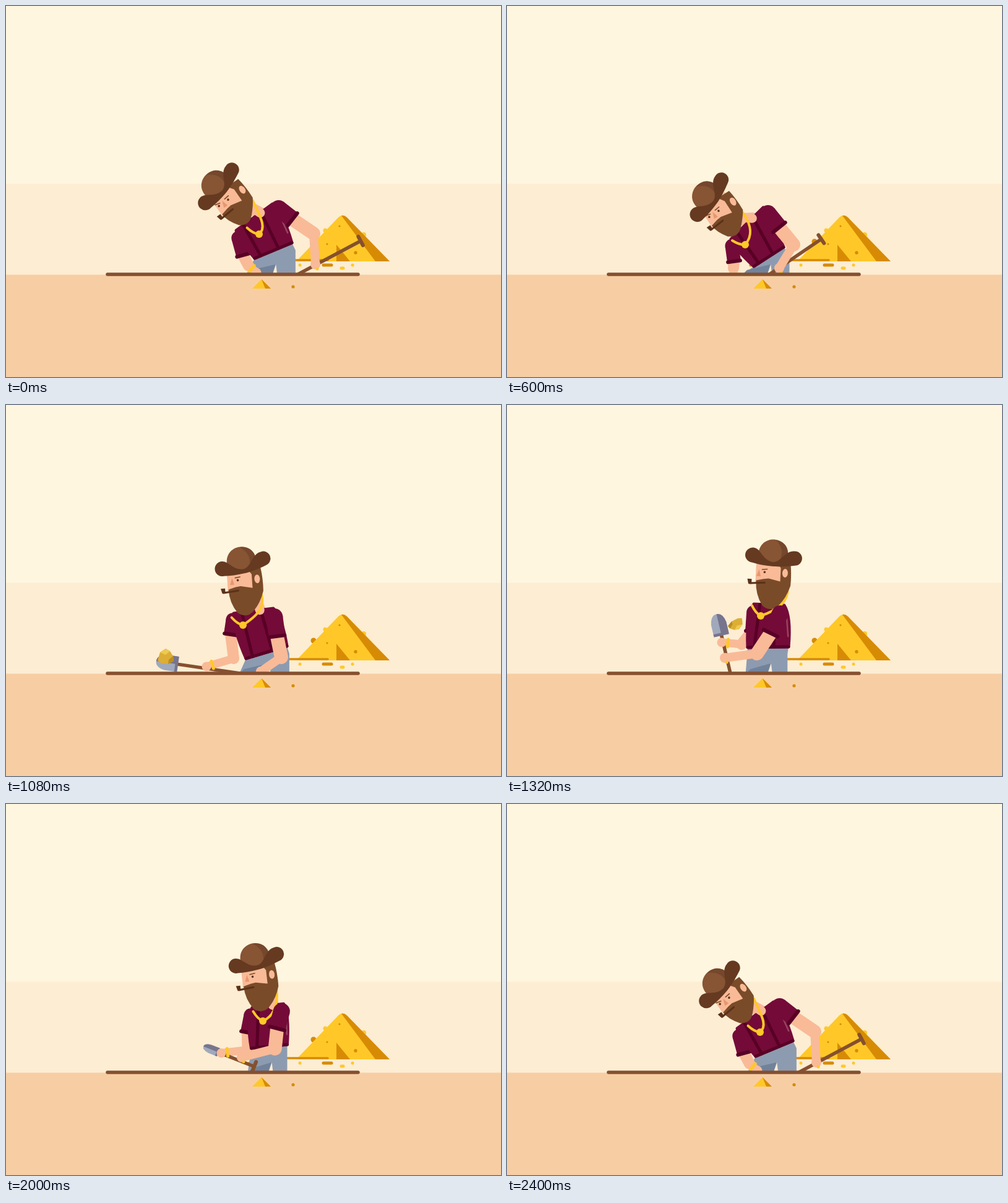
An HTML page with a canvas for the animation above (2440 ms loop, 800x600 px).

```html
<!DOCTYPE html>
<html lang="en">
<head>
<meta charset="utf-8">
<title>Gold digger</title>
<style>
html, body { margin: 0; width: 100%; height: 100%; overflow: hidden; background: #fff6e0; }
canvas { display: block; }
</style>
</head>
<body>
<canvas id="stage" width="800" height="600"></canvas>
<script>
const ctx = document.getElementById('stage').getContext('2d');
const LOOP = 2440, RAD = Math.PI / 180;
const C = {
  skin: '#f9ba97', skinDark: '#e7966d', shirt: '#740a38', trim: '#580025', sheen: '#964460',
  hair: '#7a4b29', hat: '#875434', hatShade: '#75472c', brim: '#653a20', wood: '#85502f', pipe: '#5b3119',
  jeans: '#8d9bb0', jeansDark: '#71829b', gold: '#ffc828', goldDark: '#d78b04',
  steel: '#a0a9bc', steelDark: '#77748d', ore: '#dcae35', oreLight: '#edca50', oreDark: '#b98d20'
};

// Pose times; the first pose returns at 2400 and is held across the loop.
const TIMES = [100, 600, 1080, 1320, 1800, 2200, 2400, 2540];
const BODY = {
  head: [[335, 286], [318, 304], [379, 247], [431, 235], [423, 234], [367, 260]],
  tilt: [[-35, -50], [-33, -54], [-4, -13], [3, 6], [0, -3], [-18, -32]], // head, hat
  shoulderL: [[372, 363], [362, 377], [368, 337], [399, 322], [405, 322], [385, 344]],
  hipL: [[402, 408], [399, 421], [388, 410], [389, 392], [395, 387], [398, 405]],
  hipR: [[462, 383], [447, 390], [454, 390], [455, 391], [459, 388], [450, 390]],
  shoulderR: [[431, 320], [414, 326], [432, 329], [448, 324], [451, 324], [443, 322]],
  pendant: [[409, 369], [385, 386], [383, 356], [410, 341], [418, 344], [411, 361]]
};
const LIMBS = {
  nearCuff: [[463, 345], [440, 358], [438, 374], [426, 369], [427, 365], [454, 360]],
  nearElbow: [[497, 368], [463, 386], [445, 408], [404, 402], [413, 398], [467, 392]],
  nearHand: [[500, 418], [440, 424], [412, 431], [352, 409], [357, 406], [426, 415]],
  farCuff: [[383, 403], [367, 413], [363, 371], [396, 366], [400, 364], [380, 381]],
  farElbow: [[392, 420], [366, 424], [368, 410], [379, 387], [395, 391], [386, 408]],
  farHand: [[405, 431], [366, 445], [324, 423], [347, 384], [353, 396], [343, 412]],
  base: [[449, 446], [392, 456], [275, 419], [346, 370], [351, 386], [332, 421]],
  grip: [[573, 380], [508, 377], [414, 439], [378, 506], [364, 428], [473, 421]]
};

const lerp = (a, b, k) => [a[0] + (b[0] - a[0]) * k, a[1] + (b[1] - a[1]) * k];
const add = (a, b) => [a[0] + b[0], a[1] + b[1]];
const turn = ([x, y], r) => [x * Math.cos(r) - y * Math.sin(r), x * Math.sin(r) + y * Math.cos(r)];
const angle = (a, b) => Math.atan2(b[1] - a[1], b[0] - a[0]);

// Monotone cubic interpolation between poses.
function sample(track, t) {
  if (t < TIMES[0]) t += LOOP;
  let i = 0;
  while (i < 6 && t >= TIMES[i + 1]) i++;
  const key = n => track[n % 6], span = TIMES[i + 1] - TIMES[i], k = (t - TIMES[i]) / span;
  if (i === 6) return track[0];
  return [0, 1].map(c => {
    const slope = n => (key(n + 1)[c] - key(n)[c]) / (TIMES[n + 1] - TIMES[n]);
    const tangent = n => {
      if (n === 0 || n === 6) return 0;
      const a = slope(n - 1), b = slope(n);
      return a * b <= 0 ? 0 : 2 * a * b / (a + b);
    };
    const k2 = k * k, k3 = k2 * k, s = 3 * k2 - 2 * k3;
    return key(i)[c] * (1 - s) + key(i + 1)[c] * s
      + span * ((k3 - 2 * k2 + k) * tangent(i) + (k3 - k2) * tangent(i + 1));
  });
}

function trace(points) {
  ctx.beginPath();
  points.forEach(p => ctx.lineTo(...p));
}
function line(color, width, points, cap = 'round') {
  trace(points);
  Object.assign(ctx, { strokeStyle: color, lineWidth: width, lineCap: cap, lineJoin: 'round' });
  ctx.stroke();
}
function shape(color, ...points) {
  trace(points);
  ctx.fillStyle = color;
  ctx.fill();
}
function disc(color, [x, y], rx, ry = rx) {
  ctx.beginPath();
  ctx.ellipse(x, y, rx, ry, 0, 0, 7);
  ctx.fillStyle = color;
  ctx.fill();
}
function path(color, d) {
  ctx.fillStyle = color;
  ctx.fill(new Path2D(d));
}
function at([x, y], rotation, draw) {
  ctx.save();
  ctx.translate(x, y);
  ctx.rotate(rotation);
  draw();
  ctx.restore();
}

function scenery() {
  [['#fff6e0', 0], ['#fcedd3', 287.5], ['#f7cea4', 434.5]].forEach(([color, y]) => {
    ctx.fillStyle = color;
    ctx.fillRect(0, y, 800, 600);
  });
  disc(C.goldDark, [497, 381], 4.5);
  disc(C.gold, [516, 363], 3.5);
  disc(C.gold, [578, 370], 4);
  path(C.gold, 'M469 413L537 342Q544 335 551 342L620 413Z');
  path(C.goldDark, 'M542 339Q547 338 551 342L620 413H597Z');
  shape(C.goldDark, [534, 386], [534, 413], [556, 413]);
  disc(C.goldDark, [539, 356], 1.6);
  disc(C.goldDark, [519, 385], 1.6);
  disc(C.goldDark, [565, 399], 2.7);
  line(C.goldDark, 3.5, [[446, 411], [520, 411]]);
  line(C.goldDark, 5, [[513, 419], [526, 419]]);
  line(C.gold, 5, [[542, 424], [545, 424]]);
  disc(C.gold, [475, 419], 2.5);
  disc(C.gold, [560, 419], 2.5);
  disc(C.goldDark, [394, 419], 2.6);
  shape(C.gold, [398, 457], [413, 442], [428, 457]);
  shape(C.goldDark, [413, 442], [428, 457], [419, 457]);
  disc(C.goldDark, [464, 454], 2.6);
}

function nugget(center, rotation, squash) {
  at(center, rotation, () => {
    ctx.scale(1, squash);
    shape(C.ore, [-13, 6], [-9, -7], [0, -13], [7, -9], [12, -1], [13, 7], [4, 12], [-7, 11]);
    shape(C.oreLight, [-9, -7], [0, -13], [7, -9], [0, -3]);
    shape(C.oreDark, [4, 12], [13, 7], [12, -1], [5, 5]);
  });
}

function jeans(p, lean) {
  const left = p.hipL[0] - 28 * lean - 3, right = p.hipR[0] + 20 * lean - 2;
  const gap = left + (right - left) * .58;
  shape(C.jeans, p.hipL, p.hipR, [right, p.hipR[1] + 12], [right, 435],
    [gap + 4, 435], [gap + 2, 418], [gap - 4, 435], [left, 435]);
  shape(C.jeansDark, [left, 435], [left + 8, 427], [gap + 1, 418], [gap - 4, 435]);
}

function torso(p, r) {
  const offset = (a, b, x, y) => add(lerp(a, b, .5), turn([x, y], r));
  ctx.beginPath();
  ctx.moveTo(...p.shoulderL);
  ctx.quadraticCurveTo(...offset(p.shoulderL, p.hipL, -7, -12), ...p.hipL);
  ctx.lineTo(...p.hipR);
  ctx.quadraticCurveTo(...offset(p.shoulderR, p.hipR, 8, -16), ...p.shoulderR);
  ctx.closePath();
  Object.assign(ctx, { fillStyle: C.shirt, strokeStyle: C.shirt, lineWidth: 5, lineJoin: 'round' });
  ctx.fill();
  ctx.stroke();
  [.16, .64].forEach(k => line(C.trim, 5, [
    lerp(p.shoulderL, p.shoulderR, k + .04), lerp(p.hipL, p.hipR, k)
  ]));
  line(C.trim, 5, [p.hipL, p.hipR]);
  line(C.sheen, 2.5, [add(p.shoulderR, turn([3, 9], r)), add(lerp(p.shoulderR, p.hipR, .75), turn([1, 0], r))]);
}

function arm(shoulder, cuff, elbow, hand, upper, fore, sleeve) {
  line(C.skin, upper, [cuff, elbow]);
  line(C.skin, fore, [elbow, hand]);
  const start = lerp(shoulder, cuff, .3), r = angle(start, cuff);
  disc(C.shirt, start, sleeve / 2);
  line(C.shirt, sleeve, [start, cuff], 'butt');
  const half = turn([0, sleeve / 2 - 1], r);
  line(C.trim, 6, [add(cuff, half), add(cuff, turn(half, Math.PI))]);
}

function bracelet(elbow, hand) {
  const r = angle(hand, elbow);
  line(C.gold, 5, [[10, -6], [10, 6]].map(q => add(hand, turn(q, r))));
}

function necklace(p, r, start) {
  const end = add(p.pendant, turn([-14, -17], r));
  ctx.beginPath();
  ctx.moveTo(...start);
  ctx.bezierCurveTo(...add(start, turn([1, 28], r)), ...add(p.pendant, turn([16, -5], r)), ...p.pendant);
  ctx.quadraticCurveTo(...add(p.pendant, turn([-8, -4], r)), ...end);
  Object.assign(ctx, { strokeStyle: C.gold, lineWidth: 4, lineCap: 'round' });
  ctx.stroke();
  disc(C.gold, p.pendant, 6);
}

function face(yaw, blink) {
  const e = yaw / 2, chin = Math.min(95, 95 - .8 * yaw);
  ctx.fillStyle = C.skin;
  ctx.fillRect(-25 + e, 16, 48, 38);
  path(C.hair, `M${8 + e} 18H${30 + e}Q${33 + e} 36 ${32 + e} 56Q${26 + e} ${chin - 18} ${14 + e} ${chin - 6}`
    + `Q${2 + e} ${chin + 6} ${-12 + e} ${chin - 5}Q${-24 + e} ${chin - 22} ${-24 + e} 50`
    + `L${-12 + e} 47L${-4 + e} 46L${15 + e} 50V28Z`);
  disc(C.skin, [23 + .7 * yaw, 36], 4.5, 7);
  shape(C.skinDark, [-18 + yaw, 32], [-22 + yaw, 43], [-15 + yaw, 43]);
  (yaw > 5 ? [-9, -27] : [-9]).forEach((x, i) => {
    const eye = x + yaw, dir = i ? -1 : 1;
    line(C.hair, 1.6, [[eye - 4, 32 - (i ? 1 : 0)], [eye + 4, 32 - dir]]);
    if (blink) line(C.pipe, 1.3, [[eye - 2, 37], [eye + 2, 37]]);
    else disc(C.pipe, [eye, 36], 1.8);
  });
  const bowl = -33 + .8 * yaw;
  line(C.pipe, 3, [[bowl, 55], [bowl + 24, 53]]);
  shape(C.pipe, [bowl - 4, 48], [bowl + 3, 48], [bowl + 3, 56], [bowl - 2, 56]);
}

function hat() {
  path(C.hat, 'M-24 8C-24-26 24-26 24 8Q24 20 0 22Q-24 20-24 8Z');
  path(C.hatShade, 'M2-17C18-15 24-6 24 8Q24 18 8 21Q22 0 2-17Z');
  path(C.brim, 'M-33-1C-20-1-18 17 0 19C14 19 18-2 34-2A11.5 11.5 0 0 1 37 21C24 24 10 26 0 26Q-18 26-33 23A12 12 0 0 1-33-1Z');
}

function shovel(base, grip) {
  const r = angle(grip, base), size = Math.min(1, Math.hypot(base[0] - grip[0], base[1] - grip[1]) / 140);
  line(C.wood, 5.5, [base, grip]);
  line(C.wood, 6, [[0, -8], [0, 8]].map(q => add(grip, turn(q, r))));
  at(base, r, () => {
    ctx.scale(16 + 15 * size, 5 + 20 * size);
    path(C.steel, 'M-.05-.5H.55Q1.05-.4 1.05 0Q1.05.4.55.5H-.05Z');
    path(C.steelDark, 'M-.1-.5H.05V0H1.05Q1.05.4.55.5H-.1Z');
  });
}

function digger(t) {
  const p = {};
  Object.entries({ ...BODY, ...LIMBS }).forEach(([name, track]) => { p[name] = sample(track, t); });
  if (t < 320) {
    const push = Math.sin(Math.PI * t / 320);
    ['grip', 'base', 'nearHand'].forEach(name => { p[name] = add(p[name], [10 * push, -4 * push]); });
  }
  const r = angle(p.hipL, p.hipR), headTurn = p.tilt[0] * RAD, yaw = -.3 * p.tilt[1] - 2;
  const onHead = (x, y) => add(p.head, turn([x, y], headTurn));

  const flight = t - 1120;
  if (flight > 0 && flight < 310)
    nugget([257 + .565 * flight, 408 - .45 * flight + .000925 * flight ** 2], flight * .013, 1 - flight * .0016);

  jeans(p, -r);
  arm(p.shoulderL, p.farCuff, p.farElbow, p.farHand, 18, 13, 22);
  line(C.skin, 20, [onHead(17 + .6 * yaw, 66), lerp(p.shoulderL, p.shoulderR, .65)]);
  torso(p, r);
  line(C.skin, 15, [onHead(18 + .6 * yaw, 62), lerp(p.shoulderL, p.shoulderR, .66)]);
  necklace(p, r, onHead(28 + .6 * yaw, 60));
  at(p.head, headTurn, () => face(yaw, Math.abs(t - 1800) < 100));
  at(p.head, p.tilt[1] * RAD, hat);
  shovel(p.base, p.grip);
  if (t > 600 && flight <= 0) nugget(add(p.base, [-17, -12]), 0, 1);
  disc(C.skin, p.farHand, 7.5);
  bracelet(p.farElbow, p.farHand);
  arm(p.shoulderR, p.nearCuff, p.nearElbow, p.nearHand, 22, 14, 27);
  disc(C.skin, p.nearHand, 8);
  disc(C.gold, add(p.nearHand, [3, 7]), 2.5);
}

function frame(now) {
  scenery();
  ctx.save();
  ctx.beginPath();
  ctx.rect(0, 0, 800, 432);
  ctx.clip();
  digger(now % LOOP);
  ctx.restore();
  line(C.wood, 5.5, [[164, 434], [569, 434]]);
  requestAnimationFrame(frame);
}
requestAnimationFrame(frame);
</script>
</body>
</html>
```
